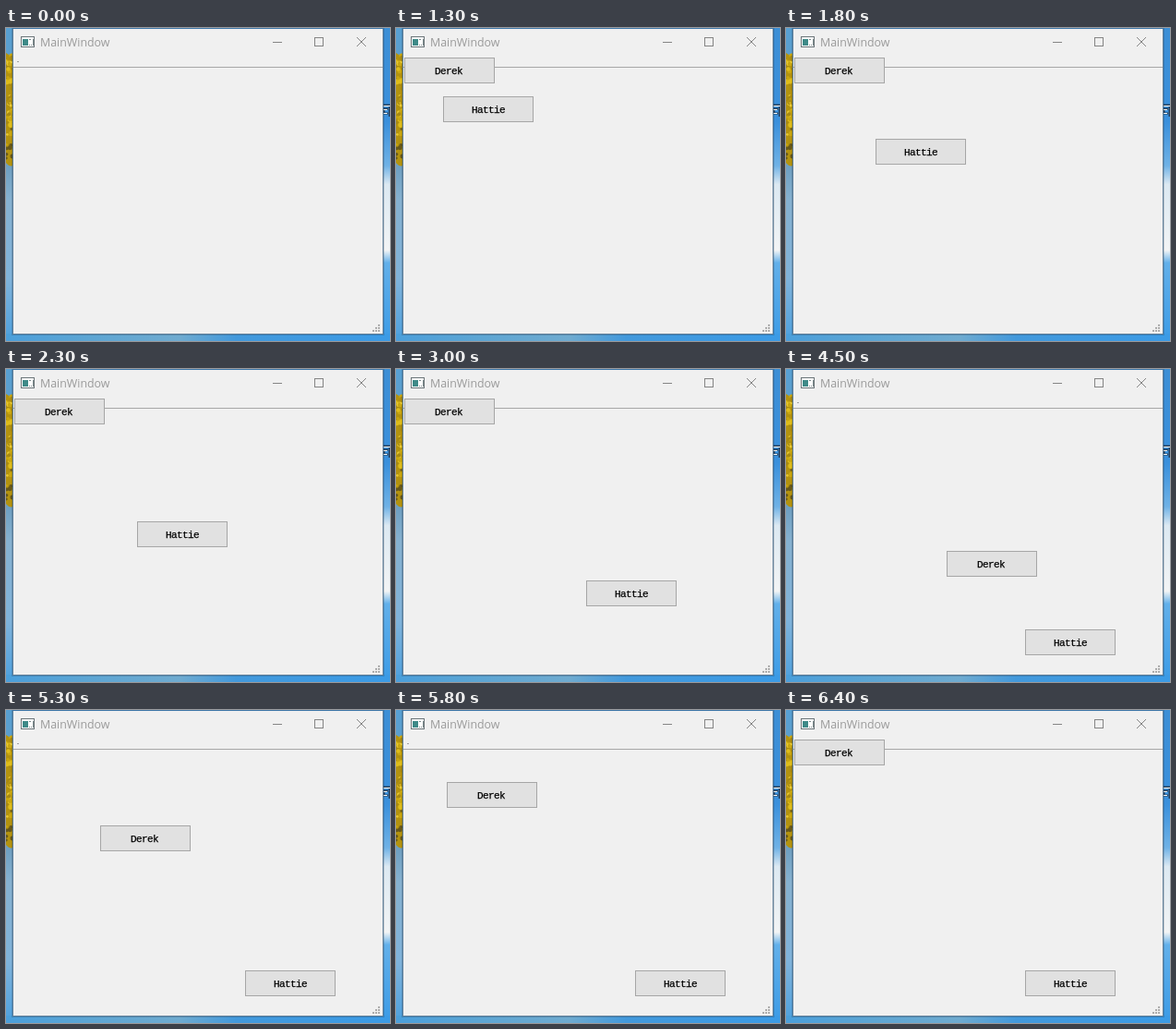
An HTML page that plays this animation: 416 by 339 pixels, repeating every 6.5 s.

```html
<!DOCTYPE html>
<html lang="en">
<head>
<meta charset="utf-8">
<title>MainWindow</title>
<style>
  html, body { margin: 0; width: 100%; height: 100%; overflow: hidden; }
  svg { display: block; width: 416px; height: 339px; }
  .title { font: 12.4px "Open Sans", sans-serif; fill: #9a9a9a; }
  .line { fill: none; stroke: #858585; }
  .button rect { fill: #e1e1e1; stroke: #a6a6a6; shape-rendering: crispEdges; }
  .button text {
    font: 11px "Liberation Mono", monospace;
    letter-spacing: -.6px;
    stroke: #000;
    stroke-width: .25px;
  }
</style>
</head>
<body>
<svg viewBox="0 0 416 339">
  <defs>
    <linearGradient id="left" x2="0" y2="1">
      <stop offset="0" stop-color="#58a0d2"/>
      <stop offset=".42" stop-color="#6a9cbe"/>
      <stop offset=".55" stop-color="#86b1d0"/>
      <stop offset=".8" stop-color="#80b3da"/>
      <stop offset="1" stop-color="#4da0de"/>
    </linearGradient>
    <linearGradient id="right" x2="0" y2="1">
      <stop offset="0" stop-color="#3c8fd6"/>
      <stop offset=".3" stop-color="#3a90dc"/>
      <stop offset=".44" stop-color="#6fb2e6"/>
      <stop offset=".5" stop-color="#dce9f2"/>
      <stop offset=".71" stop-color="#f2f4f5"/>
      <stop offset=".75" stop-color="#62b0ea"/>
      <stop offset="1" stop-color="#3b9be6"/>
    </linearGradient>
    <linearGradient id="bottom">
      <stop offset="0" stop-color="#4b9fdb"/>
      <stop offset=".2" stop-color="#5ba5d4"/>
      <stop offset=".45" stop-color="#6fabd0"/>
      <stop offset=".6" stop-color="#4299dc"/>
      <stop offset="1" stop-color="#3b9be6"/>
    </linearGradient>
    <clipPath id="edge"><rect width="7" height="339"/></clipPath>
  </defs>

  <!-- desktop -->
  <rect width="8" height="339" fill="url(#left)"/>
  <g id="flowers" clip-path="url(#edge)"></g>
  <rect x="408" width="8" height="339" fill="url(#right)"/>
  <rect y="331" width="416" height="8" fill="url(#bottom)"/>
  <path d="M409 83.5h7M409 87.5h5M409 92.5h5M409.500 87v6M415.500 84v12" fill="none" stroke="#27405a" stroke-width="2"/>
  <path d="M408 84.500h8M409 88.500h4M409 92.500h4" fill="none" stroke="#fff"/>
  <path d="M6.500 0v332.500h403V0" fill="none" stroke="#123" stroke-opacity=".2"/>

  <!-- window -->
  <g shape-rendering="crispEdges">
    <rect x="7.500" y=".5" width="401" height="331" fill="#f0f0f0" stroke="#5f7f9a"/>
    <path d="M7 .5h402" stroke="#3f77a8"/>
    <path d="M8 42.500h400" stroke="#a6a6a6"/>
    <path d="M12 36h2" stroke="#a0a0a0"/>
    <rect x="16.500" y="9.500" width="14" height="11" fill="#fff" stroke="#6b7478"/>
    <rect x="18" y="12" width="6" height="7" fill="#3f8a88"/>
    <path d="M25 12.500h2M25 18.500h1M27 18.500h1M29 12v7" stroke="#7b8a8c"/>
    <path class="line" d="M289 15.500h10M334.500 10.500h9v9h-9z"/>
    <path d="M403 321h2v2h-2zM400 324h2v2h-2zM403 324h2v2h-2zM397 327h2v2h-2zM400 327h2v2h-2zM403 327h2v2h-2z" fill="#acacac"/>
  </g>
  <path class="line" d="M380 10l10 10M390 10l-10 10"/>
  <text class="title" x="37" y="20">MainWindow</text>

  <g class="button" id="first">
    <rect x=".5" y=".5" width="97" height="27"/>
    <text x="31" y="18">Hattie</text>
  </g>
  <g class="button" id="second">
    <rect x=".5" y=".5" width="97" height="27"/>
    <text x="33" y="18">Derek</text>
  </g>
</svg>
<script>
  const LOOP = 6500, SHOW = 900, SWAP = 3600, STEP = 100;
  const TRAVEL = 250, HOME = { x: 9, y: 32 };
  const first = document.getElementById("first");
  const second = document.getElementById("second");

  function drawFlowers() {
    let seed = 17;
    const random = () => (seed = seed * 16807 % 2147483647) / 2147483647;
    const colors = ["#c9a60f", "#dfbd1b", "#a98a12", "#e8c935"];
    let blobs = '<path d="M0 27Q7 30 8 42V148Q5 152 0 146Z" fill="#b4930f"/>';
    for (let i = 0; i < 60; i++) {
      const y = 30 + random() * 113;
      const dark = y > 105 && random() < .5;
      const color = dark ? "#67581a" : colors[Math.floor(random() * 4)];
      blobs += `<circle cx="${random() * 7}" cy="${y}" r="${1 + random() * 2}" fill="${color}"/>`;
    }
    document.getElementById("flowers").innerHTML = blobs;
  }

  // Diagonal distance covered, in whole 16 ms ticks of a 3 s linear move.
  function distance(elapsed, lead) {
    const ticks = Math.floor(lead + Math.floor(elapsed / STEP) * 48 / 7);
    return Math.max(0, Math.min(TRAVEL, Math.floor(ticks * 4 / 3)));
  }

  function place(button, d) {
    button.setAttribute("transform", `translate(${HOME.x + d} ${HOME.y + d})`);
  }

  function render(t) {
    const display = t < SHOW ? "none" : "inline";
    first.style.display = second.style.display = display;
    place(first, distance(t - SHOW, 4.93));
    place(second, t < SWAP ? 0 : TRAVEL - distance(t - SWAP, 2.35));
  }

  drawFlowers();
  const start = performance.now();
  function tick() {
    render((performance.now() - start) % LOOP);
    requestAnimationFrame(tick);
  }
  tick();
</script>
</body>
</html>
```
